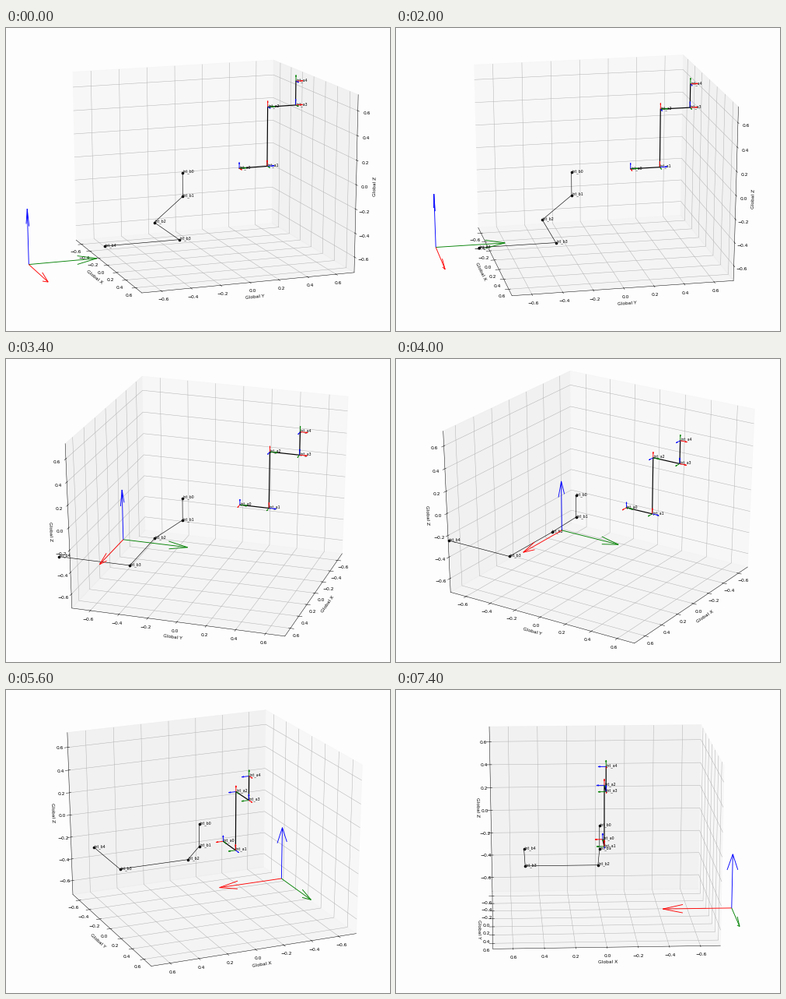
A matplotlib script that plays this animation: 494x389 px, repeating every 8 s.

```python
import numpy as np
import matplotlib.pyplot as plt
from matplotlib.animation import FuncAnimation

W, H, DPI = 494, 389, 43
PAPER = "#fdfdfe"
INTERVAL, FRAMES = 200, 40
HOLD = 5                      # frames before the camera starts moving

# camera keys: step, azimuth, elevation
STEP = np.array([0, 5, 9, 15, 20, 27, 32])
AZIM = np.array([-20, -11.6, 3.2, 33.1, 56.1, 77.4, 87])
ELEV = np.array([15, 20, 24, 27, 24.7, 19.5, 16])

CHAIN_A = [(0, .2, 0), (0, .4, 0), (0, .4, .5), (0, .6, .5), (0, .6, .7)]
CHAIN_B = [(0, -.2, 0), (0, -.2, -.2), (0, -.4, -.4), (.5, -.4, -.4), (.5, -.9, -.4)]
# world axis followed by the red, green and blue arrow of each joint
AXES_A = ["xyz", "zxy", "zyx", "yxz", "yzx"]
WORLD = {"x": (1, 0, 0), "y": (0, 1, 0), "z": (0, 0, 1)}


def hermite(t, keys, values):
    """Smooth curve through the keys."""
    slopes = np.gradient(values, keys)
    i = int(np.clip(np.searchsorted(keys, t, side="right") - 1, 0, len(keys) - 2))
    span = keys[i + 1] - keys[i]
    s = (t - keys[i]) / span
    return ((1 + 2 * s) * (1 - s) ** 2 * values[i]
            + s * (1 - s) ** 2 * span * slopes[i]
            + s * s * (3 - 2 * s) * values[i + 1]
            + s * s * (s - 1) * span * slopes[i + 1])


def draw_triad(origin, order, length):
    for axis, color in zip(order, ("red", "green", "blue")):
        ax.quiver(*origin, *WORLD[axis], length=length, color=color, linewidth=1.5)


def draw_chain(points, name, **style):
    ax.plot(*zip(*points), color="black", **style)
    for i, p in enumerate(points):
        ax.text(*p, f"jnt_{name}{i}", fontsize=8)


fig = plt.figure(figsize=(W / DPI, H / DPI), dpi=DPI, facecolor=PAPER)
ax = fig.add_axes([6 / W, -3.5 / H, 502 / W, 408 / H], projection="3d", facecolor=PAPER)
ax.apply_aspect = lambda position=None: None   # keep the wide viewport
ax.set_box_aspect((1, 1, 1), zoom=.9467)

draw_chain(CHAIN_A, "a", linewidth=2)
draw_chain(CHAIN_B, "b", linewidth=1, marker="o", markersize=5)
for point, order in zip(CHAIN_A, AXES_A):
    draw_triad(point, order, .05)
draw_triad((-1, -1, -1), "xyz", .5)

lim = (-.729, .729)
ax.set(xlim=lim, ylim=lim, zlim=lim,
       xlabel="Global X", ylabel="Global Y", zlabel="Global Z")
for axis in (ax.xaxis, ax.yaxis, ax.zaxis):
    axis.set_ticks(np.arange(-3, 4) * .2)


def update(frame):
    t = min(max(frame - HOLD, 0), STEP[-1])
    ax.view_init(elev=hermite(t, STEP, ELEV), azim=hermite(t, STEP, AZIM))
    return []


anim = FuncAnimation(fig, update, frames=FRAMES, interval=INTERVAL,
                     init_func=lambda: update(0), repeat=True, repeat_delay=0)
plt.show()
```
